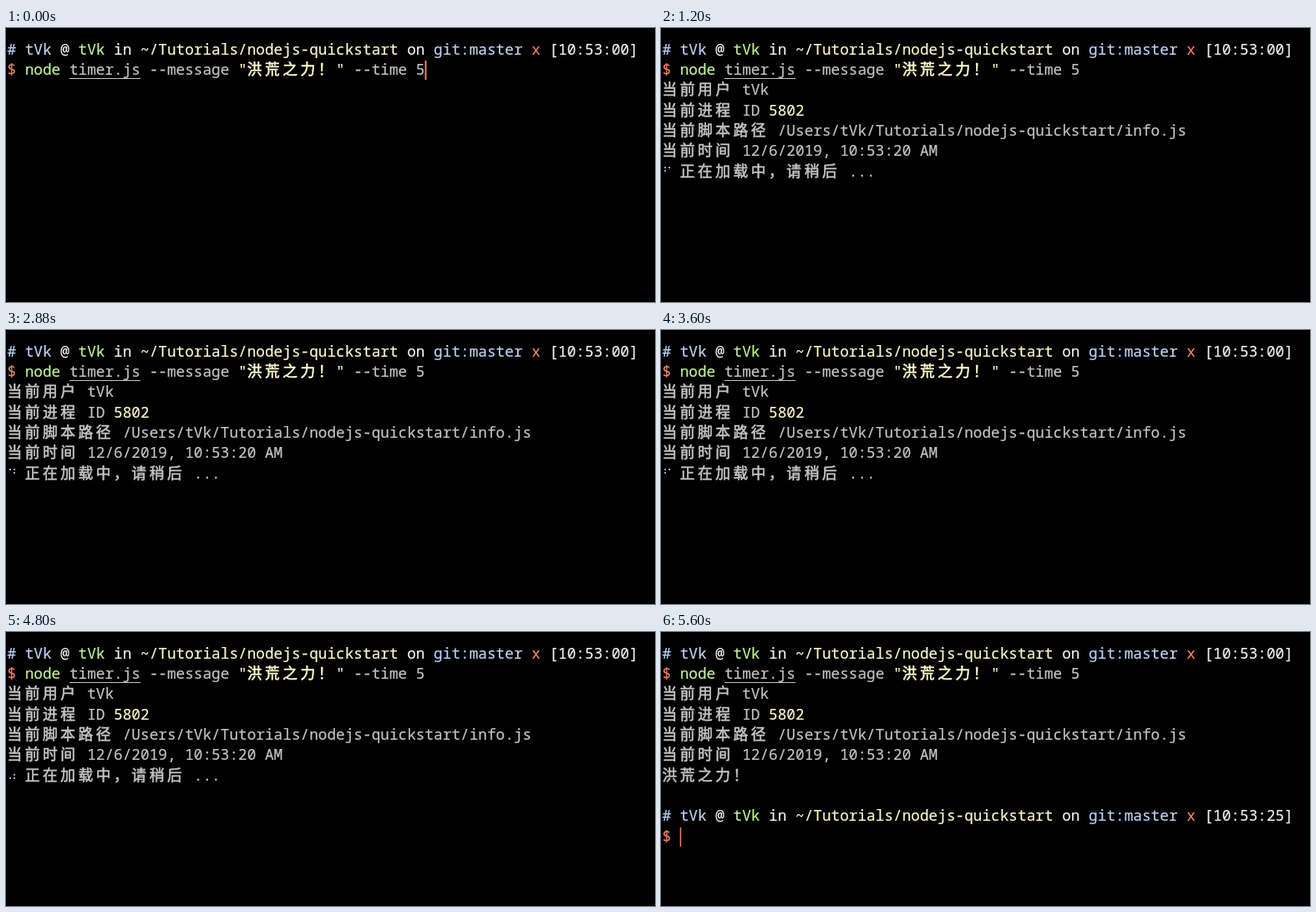
These frames come from a looping animation (777x328 px, 6.6 s). An HTML page with a canvas:

```html
<!DOCTYPE html>
<html lang="zh-CN">
<head>
<meta charset="utf-8">
<title>Terminal timer</title>
<style>
  html, body { margin: 0; width: 100%; height: 100%; overflow: hidden; background: #000; }
  canvas { display: block; }
</style>
</head>
<body>
<canvas id="screen" width="777" height="328"></canvas>
<script>
const ctx = document.getElementById('screen').getContext('2d');

const LOOP = 6600, TICK = 80;
const ENTER = 160, START = 400, DONE = 5400, PROMPT = 5480;
const LEFT = 1.4, CELL = 10.64, BASE = 32, LINE = 24.35;
const USER = 'tVk';
const SPINNER = '⠋⠙⠹⠸⠼⠴⠦⠧⠇⠏';

const GRAY = '#c4c4c4', WHITE = '#f0f0f0', BLUE = '#b9cff6', CYAN = '#c3d2f2',
      GREEN = '#c2f094', YELLOW = '#fcf8cc', RED = '#f08068';

ctx.font = '17.72px "Noto Sans Mono", "Noto Sans CJK SC", "Noto Sans CJK", monospace';
ctx.lineJoin = 'round';

const columnX = col => LEFT + col * CELL;
const baseline = row => Math.floor(BASE + row * LINE);
const isWide = char => char > '\u2e7f';

// Draws [text, color] runs on the terminal grid; CJK characters take two cells.
// A thin outline gives the medium weight of the terminal font.
function drawRow(row, ...runs) {
  let col = 0;
  for (const [text, color] of runs) {
    ctx.fillStyle = ctx.strokeStyle = color;
    for (const char of text) {
      const wide = isWide(char);
      ctx.lineWidth = wide ? 0.6 : 0.2;
      ctx.fillText(char, columnX(col), baseline(row));
      ctx.strokeText(char, columnX(col), baseline(row));
      col += wide ? 2 : 1;
    }
  }
}

function drawCursor(row, col, width = 1.5) {
  ctx.fillStyle = RED;
  ctx.fillRect(columnX(col), baseline(row) - 17, width, 23);
}

function drawPrompt(row, time) {
  drawRow(row, ['# ', BLUE], [USER, CYAN], [' @ ', WHITE], [USER, GREEN], [' in ', WHITE],
    ['~/Tutorials/nodejs-quickstart', YELLOW], [' on ', WHITE], ['git:', BLUE],
    ['master', CYAN], [' x ', RED], [`[${time}]`, WHITE]);
}

function drawCommand() {
  drawRow(1, ['$ ', RED], ['node ', GREEN], ['timer.js --message ', GRAY],
    ['"洪荒之力！"', YELLOW], [' --time 5', GRAY]);
  ctx.fillStyle = GRAY;
  ctx.fillRect(76, 60, 85, 1);
}

function drawInfo() {
  drawRow(2, ['当前用户 ' + USER, GRAY]);
  drawRow(3, ['当前进程 ID ', GRAY], ['5802', YELLOW]);
  drawRow(4, [`当前脚本路径 /Users/${USER}/Tutorials/nodejs-quickstart/info.js`, GRAY]);
  drawRow(5, ['当前时间 12/6/2019, 10:53:20 AM', GRAY]);
}

// The low six bits of a braille code are its dots, column by column.
function drawSpinner(step) {
  const bits = SPINNER.charCodeAt(step % SPINNER.length) & 63;
  ctx.fillStyle = BLUE;
  for (let dot = 0; dot < 6; dot++) {
    if (!(bits >> dot & 1)) continue;
    ctx.beginPath();
    ctx.arc(dot < 3 ? 5 : 10, 167 + dot % 3 * 4, 1.1, 0, 2 * Math.PI);
    ctx.fill();
  }
  drawRow(6, ['  正在加载中，请稍后 ...', GRAY]);
}

function draw(time) {
  ctx.fillStyle = '#000';
  ctx.fillRect(0, 0, 777, 328);
  drawPrompt(0, '10:53:00');
  drawCommand();
  if (time < ENTER) return drawCursor(1, 47, 2);
  if (time < START) return drawCursor(2, 0);
  drawInfo();
  if (time < DONE) return drawSpinner(Math.floor((time - START) / TICK));
  drawRow(6, ['洪荒之力！', GRAY]);
  if (time < PROMPT) return drawCursor(7, 0);
  drawPrompt(8, '10:53:25');
  drawRow(9, ['$', RED]);
  drawCursor(9, 2);
}

const origin = performance.now();
function frame() {
  draw((performance.now() - origin) % LOOP);
  requestAnimationFrame(frame);
}
frame();
</script>
</body>
</html>
```
